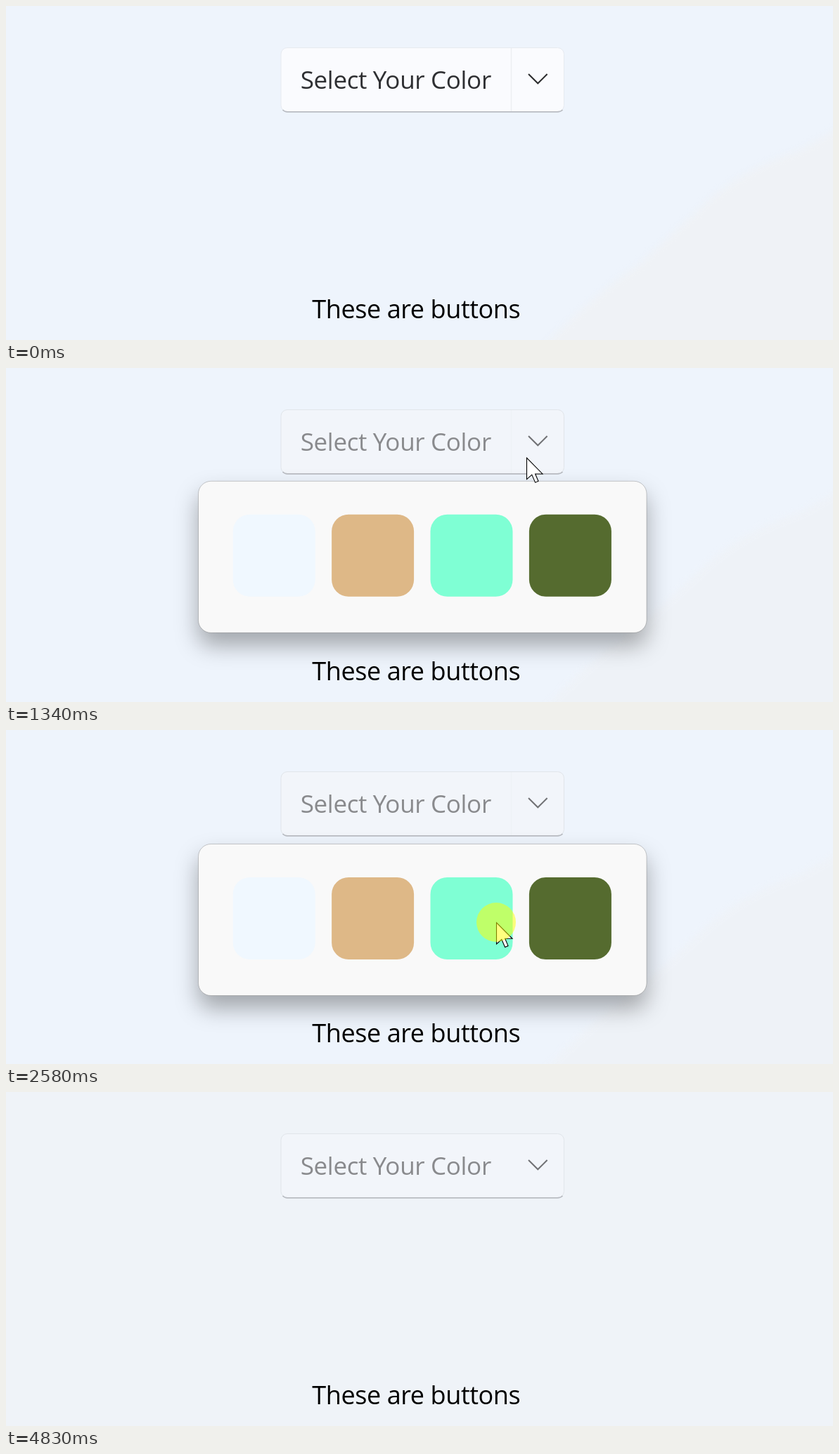
Write an HTML page that moves like this. It is 1176 px wide and 476 px high and loops after 4.9 s.

```html
<!DOCTYPE html>
<html lang="en">
<head>
<meta charset="utf-8">
<title>Color picker</title>
<style>
  html, body { margin: 0; width: 100%; height: 100%; overflow: hidden; background: #eef4fc; }
  svg { display: block; width: 1176px; height: 476px; }
  text { font-family: "Open Sans", "Noto Sans", sans-serif; }
  #label { font-size: 35px; letter-spacing: -.33px; }
  #note { font-size: 36px; letter-spacing: -.42px; }
  #panel { filter: drop-shadow(0 18px 16px rgba(0, 0, 0, .32)); }
  #tint { filter: blur(5px); }
</style>
</head>
<body>
<svg viewBox="0 0 1176 476">
  <rect id="back" width="1176" height="476"/>
  <path id="tint" fill="#eff2f6" d="M1200 165L1130 205Q1040 235 985 290L900 368Q830 415 750 500H1200Z"/>

  <g id="button">
    <rect id="face" x="391" y="59.5" width="402.5" height="91" rx="9"/>
    <path fill="none" stroke="#b9bcc2" stroke-width="1.7" d="M393.5 148Q396 150.8 400 150.8H784Q789 150.8 791.5 148"/>
    <path id="split" d="M718.5 60V150" stroke-width="1.5"/>
    <text id="label" x="418.7" y="117.5">Select Your Color</text>
    <path id="chevron" d="M743 97L756.3 110.3L769.6 97" fill="none" stroke-width="2"/>
  </g>

  <text id="note" x="435.3" y="445">These are buttons</text>

  <g id="flyout">
    <rect id="panel" x="273.5" y="162.5" width="637.5" height="216" rx="18" fill="#f9f9f9" stroke="#000" stroke-opacity=".2"/>
    <g id="swatches"></g>
  </g>

  <g id="pointer">
    <path d="M.5 .5V31L7.8 24.5L12.6 35.5L17 33.6L12.6 23.3H23Z" fill="#fff" stroke="#000" stroke-width="1.1"/>
    <circle id="click" r="28" fill="#ff0" fill-opacity=".5"/>
  </g>
</svg>
<script>
const LOOP = 4900, TICK = 67;
const SHOW = 330, OPEN = 1125, GONE = 4560, CLOSE = 4830;
const PRESS = 140;

// Where the pointer rests, when it arrives and leaves, when it presses
const stops = [
  { x: 885, y: 225, come: 320, go: 320 },
  { x: 629, y: 130, come: 530, go: 530 },
  { x: 764, y: 117.5, come: 730, go: 1270, press: 990 },
  { x: 402, y: 270.5, come: 1620, go: 2030, press: 1890 },
  { x: 530, y: 277, come: 2170, go: 2310, press: 2170 },
  { x: 697, y: 274, come: 2510, go: 2650, press: 2580 },
  { x: 791, y: 277, come: 2840, go: 3920, press: 2860 },
  { x: 1046, y: 450, come: 4460, go: GONE }
];

const $ = id => document.getElementById(id);
const set = (el, attrs) => {
  for (const k in attrs) el.setAttribute(k, attrs[k]);
};
const clamp = v => Math.min(1, Math.max(0, v));
const ease = u => u * u * (3 - 2 * u);
const mix = (a, b, u) => a + (b - a) * u;

["#f0f8ff", "#deb887", "#7fffd4", "#556b2f"].forEach((fill, i) => {
  const r = document.createElementNS("http://www.w3.org/2000/svg", "rect");
  set(r, { x: 322.7 + i * 140.4, y: 210, width: 117, height: 117, rx: 24, fill });
  $("swatches").append(r);
});

function pointerAt(t) {
  const i = Math.max(0, stops.findLastIndex(s => s.go <= t));
  const a = stops[i], b = stops[i + 1] || a;
  const u = ease(clamp((t - a.go) / (b.come - a.go || 1)));
  return [mix(a.x, b.x, u), mix(a.y, b.y, u)];
}

function drawButton(dim, closed) {
  set($("face"), {
    fill: dim ? "#f2f5fa" : "#fafbfe",
    stroke: dim ? "#e1e5ea" : "#e6eaf0"
  });
  set($("split"), { stroke: dim ? "#eef2f6" : "#eceff3", opacity: closed ? 0 : 1 });
  set($("label"), { fill: dim ? "#898a8d" : "#2e2f32" });
  set($("chevron"), { stroke: dim ? "#707174" : "#2a2b2d" });
}

function draw(t) {
  const step = SHOW - 10 + Math.floor((t - SHOW + 10) / TICK) * TICK;
  const age = step - OPEN;
  const dim = t >= OPEN, closed = t >= CLOSE;

  set($("back"), { fill: closed ? "#eff3f8" : "#eef4fc" });
  set($("tint"), { opacity: closed ? 0 : dim ? .7 : 1 });
  drawButton(dim, closed);

  // The panel fades in while it slides down to rest
  const open = age >= -TICK / 2 && dim && !closed;
  set($("flyout"), {
    opacity: open ? clamp(.2 + age / 205) : 0,
    transform: `translate(0 ${open ? -21 * Math.exp(-age / 70) : 0})`
  });

  const pressed = stops.some(s => t >= s.press && t < s.press + PRESS);
  set($("pointer"), {
    visibility: t >= SHOW && t < GONE ? "visible" : "hidden",
    transform: `translate(${pointerAt(step)})`
  });
  set($("click"), { opacity: pressed ? 1 : 0 });
}

function tick() {
  draw(performance.now() % LOOP);
  requestAnimationFrame(tick);
}
tick();
</script>
</body>
</html>
```
